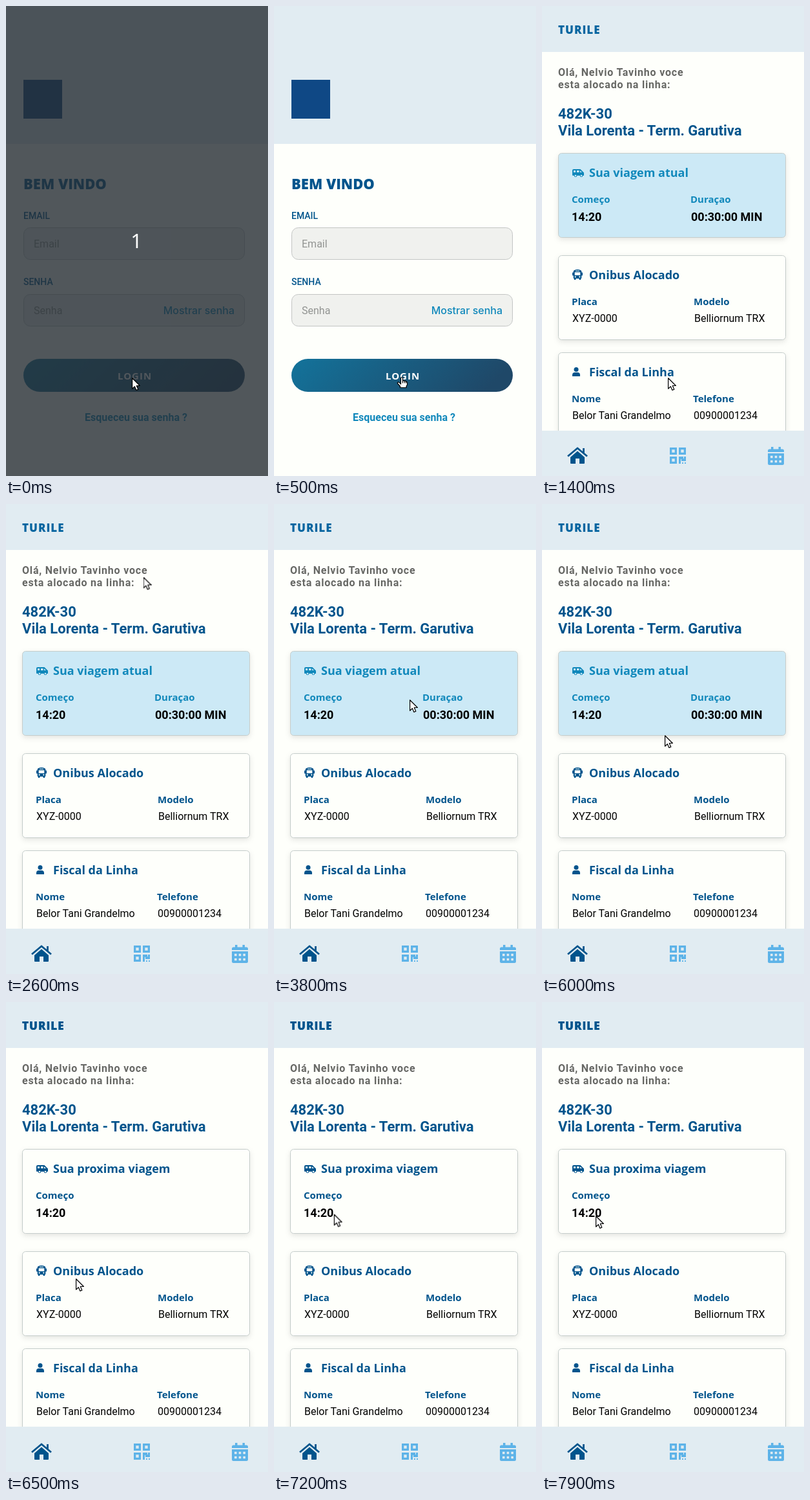
Recreate the animation shown at these times as an HTML page. Size 406 px wide and 726 px high, loop 8 s.

```html
<!DOCTYPE html>
<html lang="pt">
<head>
<meta charset="utf-8">
<title>Bus crew app</title>
<style>
html, body { margin: 0; width: 100%; height: 100%; overflow: hidden; background: #fefffb; }
svg { display: block; width: 100vw; height: 100vh; }
text { font-family: Roboto, sans-serif; font-size: 16px; white-space: pre; }

.login, .home, .current, .upcoming, .countdown, .arrow, .hand { animation: 8s step-end infinite; }
.login { animation-name: login; }
.home { animation-name: home; }
.current { animation-name: current; }
.upcoming { animation-name: upcoming; }
.countdown { animation-name: countdown; }
.hand { animation-name: hand; }
.arrow { animation-name: arrow, move; }

@keyframes login { 0% { opacity: 1 } 17.5%, 100% { opacity: 0 } }
@keyframes home { 0% { opacity: 0 } 17.5%, 100% { opacity: 1 } }
@keyframes current { 0% { opacity: 1 } 81.25%, 100% { opacity: 0 } }
@keyframes upcoming { 0% { opacity: 0 } 81.25%, 100% { opacity: 1 } }
@keyframes countdown { 0% { opacity: 1 } 6.25%, 100% { opacity: 0 } }
@keyframes hand { 0% { opacity: 0 } 6.25% { opacity: 1 } 17.5%, 100% { opacity: 0 } }
@keyframes arrow { 0% { opacity: 1 } 6.25% { opacity: 0 } 17.5%, 100% { opacity: 1 } }

/* The pointer is sampled every 100 ms, so each stretch uses one step per sample. */
@keyframes move {
  0% { transform: translate(195px, 574px) }
  23.75% { transform: translate(195px, 574px); animation-timing-function: steps(3) }
  27.5% { transform: translate(90px, 340px) }
  28.75% { transform: translate(84px, 265px); animation-timing-function: steps(2) }
  31.25% { transform: translate(150px, 140px); animation-timing-function: steps(2) }
  33.75% { transform: translate(275px, 85px) }
  38.75% { transform: translate(271px, 110px) }
  40% { transform: translate(271px, 110px); animation-timing-function: steps(3) }
  43.75% { transform: translate(311px, 240px); animation-timing-function: steps(2) }
  46.25% { transform: translate(235px, 305px) }
  47.5% { transform: translate(210px, 302px) }
  48.75% { transform: translate(192px, 312px); animation-timing-function: steps(2) }
  51.25% { transform: translate(234px, 336px) }
  52.5% { transform: translate(239px, 340px) }
  56.25% { transform: translate(239px, 340px); animation-timing-function: steps(4) }
  61.25% { transform: translate(88px, 462px) }
  62.5% { transform: translate(86px, 467px); animation-timing-function: steps(4) }
  67.5% { transform: translate(209px, 470px) }
  71.25% { transform: translate(202px, 391px) }
  72.5% { transform: translate(202px, 391px); animation-timing-function: steps(4) }
  77.5% { transform: translate(178px, 323px) }
  81.25% { transform: translate(108px, 427px) }
  82.5% { transform: translate(108px, 427px); animation-timing-function: steps(2) }
  85% { transform: translate(40px, 469px) }
  86.25% { transform: translate(11px, 440px); animation-timing-function: steps(4) }
  91.25% { transform: translate(120px, 290px); animation-timing-function: steps(2) }
  93.75% { transform: translate(197px, 270px) }
  95% { transform: translate(240px, 285px) }
  96.25% { transform: translate(268px, 267px); animation-timing-function: steps(2) }
  98.75%, 100% { transform: translate(83px, 330px) }
}

.open { font-family: "Open Sans", sans-serif; font-weight: 700; }
.heavy { font-weight: 800; }
.navy { fill: #00548c; }
.sky { fill: #1088bb; }
.light { fill: #5db3e8; }
.bar { fill: #e1ecf2; }
.field { fill: #f0f1ee; stroke: #c3c5c4; }
.hint { fill: #929492; }
.small { font-size: 14px; font-weight: 500; }
.brand { font-size: 17px; letter-spacing: 1px; }
.greeting { font-weight: 700; fill: #666764; letter-spacing: .8px; }
.route { font-size: 22px; font-weight: 700; }
.title { font-size: 18px; }
.label { font-size: 15px; }
.strong { font-size: 18px; font-weight: 700; }
.card { fill: #fefffb; stroke: #c5cdcb; filter: drop-shadow(0 3px 4px rgba(0, 0, 0, .1)); }
.card.active { fill: #cce9f6; }
.pointer { fill: #fff; stroke: #000; stroke-width: 1.2; stroke-linejoin: round; }
</style>
</head>
<body>
<svg viewBox="0 0 406 726" preserveAspectRatio="none">
  <defs>
    <linearGradient id="button" x1="0" y1="0" x2="1" y2=".15">
      <stop stop-color="#13739b"/><stop offset="1" stop-color="#1f4868"/>
    </linearGradient>
    <path id="van" fill-rule="evenodd" d="M2 0H12.5L18 5.5V10H16.3A2.3 2.3 0 0 1 11.7 10H7.3A2.3 2.3 0 0 1 2.7 10H1Q0 10 0 9V2Q0 0 2 0ZM2 2V5H5V2ZM7 2V5H10.5V2ZM12 2.2V5H15ZM5 8.8A1.3 1.3 0 1 0 5 11.4 1.3 1.3 0 1 0 5 8.8ZM14 8.8A1.3 1.3 0 1 0 14 11.4 1.3 1.3 0 1 0 14 8.8Z"/>
    <path id="bus" fill-rule="evenodd" d="M1.7 2.5Q3 0 8 0T14.3 2.5V4.5H15Q16 4.5 16 5.5V8.5Q16 9.5 15 9.5H14.3V13Q14.3 14 13.3 14V15Q13.3 16 12.3 16H11.5Q10.5 16 10.5 15V14H5.5V15Q5.5 16 4.5 16H3.7Q2.7 16 2.7 15V14Q1.7 14 1.7 13V9.5H1Q0 9.5 0 8.5V5.5Q0 4.5 1 4.5H1.7ZM5 1.7V2.7H11V1.7ZM3.7 4.2V9H12.3V4.2ZM4.7 10.3A1.1 1.1 0 1 0 4.7 12.5 1.1 1.1 0 1 0 4.7 10.3ZM11.3 10.3A1.1 1.1 0 1 0 11.3 12.5 1.1 1.1 0 1 0 11.3 10.3Z"/>
    <path id="finder" fill-rule="evenodd" d="M0 0H11V11H0ZM3.3 3.3V7.7H7.7V3.3Z"/>
  </defs>

  <rect width="406" height="726" fill="#fefffb"/>

  <g class="login">
    <rect class="bar" width="406" height="213"/>
    <rect x="27" y="114" width="60" height="60" fill="#0f4885"/>
    <text class="open heavy navy" x="27" y="283" style="font-size:22px">BEM VINDO</text>
    <text class="small navy" x="27" y="329">EMAIL</text>
    <rect class="field" x="27.5" y="342.5" width="342" height="49" rx="10"/>
    <text class="hint" x="43" y="373">Email</text>
    <text class="small navy" x="27" y="431">SENHA</text>
    <rect class="field" x="27.5" y="445.5" width="342" height="49" rx="10"/>
    <text class="hint" x="43" y="476">Senha</text>
    <text class="sky" x="354" y="476" text-anchor="end" style="font-family:Inter,sans-serif;font-weight:500">Mostrar senha</text>
    <rect x="27" y="545" width="343" height="51" rx="25.5" fill="url(#button)"/>
    <text class="open" x="173" y="577" fill="#fff" style="font-size:15px;letter-spacing:1px">LOGIN</text>
    <text class="sky" x="122" y="641" font-weight="700">Esqueceu sua senha ?</text>
  </g>

  <g class="countdown">
    <rect width="406" height="726" fill="#262d34" fill-opacity=".8"/>
    <text x="202" y="374" text-anchor="middle" fill="#fff" style="font-family:'Noto Sans',sans-serif;font-size:31px">1</text>
  </g>

  <g class="home">
    <rect width="406" height="726" fill="#fefffb"/>
    <rect class="bar" width="406" height="71"/>
    <text class="open heavy brand" x="25" y="43" fill="#0565a0">TURILE</text>
    <text class="greeting" x="25" y="108">Olá, Nelvio Tavinho voce</text>
    <text class="greeting" x="25" y="127">esta alocado na linha:</text>
    <text class="route navy" x="25" y="174">482K-30</text>
    <text class="route navy" x="25" y="200">Vila Lorenta - Term. Garutiva</text>

    <g class="current">
      <rect class="card active" x="25.5" y="227.5" width="352" height="130" rx="5"/>
      <g class="sky">
        <use href="#van" x="47" y="252"/>
        <text class="open title" x="73" y="264">Sua viagem atual</text>
        <text class="open label" x="46" y="304">Começo</text>
        <text class="open label" x="230" y="304">Duraçao</text>
      </g>
      <text class="strong" x="231" y="332">00:30:00 MIN</text>
    </g>
    <g class="upcoming">
      <rect class="card" x="25.5" y="227.5" width="352" height="130" rx="5"/>
      <g class="navy">
        <text class="open heavy brand" x="25" y="43">TURILE</text>
        <use href="#van" x="47" y="252"/>
        <text class="open title" x="73" y="264">Sua proxima viagem</text>
        <text class="open label" x="46" y="304">Começo</text>
      </g>
    </g>
    <text class="strong" x="46" y="332">14:20</text>

    <rect class="card" x="25.5" y="385.5" width="352" height="130" rx="5"/>
    <rect class="card" x="25.5" y="535.5" width="352" height="130" rx="5"/>
    <g class="navy">
      <use href="#bus" x="47" y="407"/>
      <text class="open title" x="73" y="422">Onibus Alocado</text>
      <text class="open label" x="46" y="462">Placa</text>
      <text class="open label" x="235" y="462">Modelo</text>
      <circle cx="53" cy="561.5" r="3.5"/>
      <path d="M47 572V570Q47 566 51 566H55Q59 566 59 570V572Z"/>
      <text class="open title" x="73" y="572">Fiscal da Linha</text>
      <text class="open label" x="46" y="612">Nome</text>
      <text class="open label" x="234" y="612">Telefone</text>
    </g>
    <text x="47" y="488">XYZ-0000</text>
    <text x="236" y="488">Belliornum TRX</text>
    <text x="47" y="638">Belor Tani Grandelmo</text>
    <text x="235" y="638">00900001234</text>

    <rect class="bar" y="656" width="406" height="70"/>
    <g class="navy">
      <path d="M44 697 55 687.5 66 697V706Q66 707 65 707H58V699H52V707H45Q44 707 44 706Z"/>
      <path d="M40 695.5 55 683 70 695.5M64.5 683V690" fill="none" stroke="#00548c" stroke-width="2.8"/>
    </g>
    <g class="light">
      <use href="#finder" x="198" y="682"/>
      <use href="#finder" x="212" y="682"/>
      <use href="#finder" x="198" y="696"/>
      <path d="M212 696H219V699H220V696H223V703H216V700H215V707H212ZM217 705H219V707H217ZM221 705H223V707H221Z"/>
      <path d="M350 689V687Q350 684.5 352.5 684.5H355V681H358.5V684.5H366.5V681H370V684.5H372.5Q375 684.5 375 687V689ZM350 691H375V706.5Q375 709 372.5 709H352.5Q350 709 350 706.5Z"/>
      <path d="M354 696.5H371M354 703.5H371" stroke="#e1ecf2" stroke-width="3.6" stroke-dasharray="3.6 3.1"/>
    </g>
  </g>

  <path class="pointer arrow" d="M.6 .8V17.2L4.4 13.7 6.9 19.4 9.8 18.2 7.3 12.5H12.4Z"/>
  <path class="pointer hand" d="M196.5 583V575Q196.5 573.5 198 573.5T199.5 575V579Q201 578 202.3 579.3 204 578.7 204.6 580 206.5 580 206.5 582V585L205 587.5V589.5H195.5V587.5L191.5 583Q191 581.3 192.7 581 194 581 196.5 584ZM199.5 579V582.5M202.3 579.5V582.5M204.6 580.3V582.5"/>
</svg>
</body>
</html>
```
